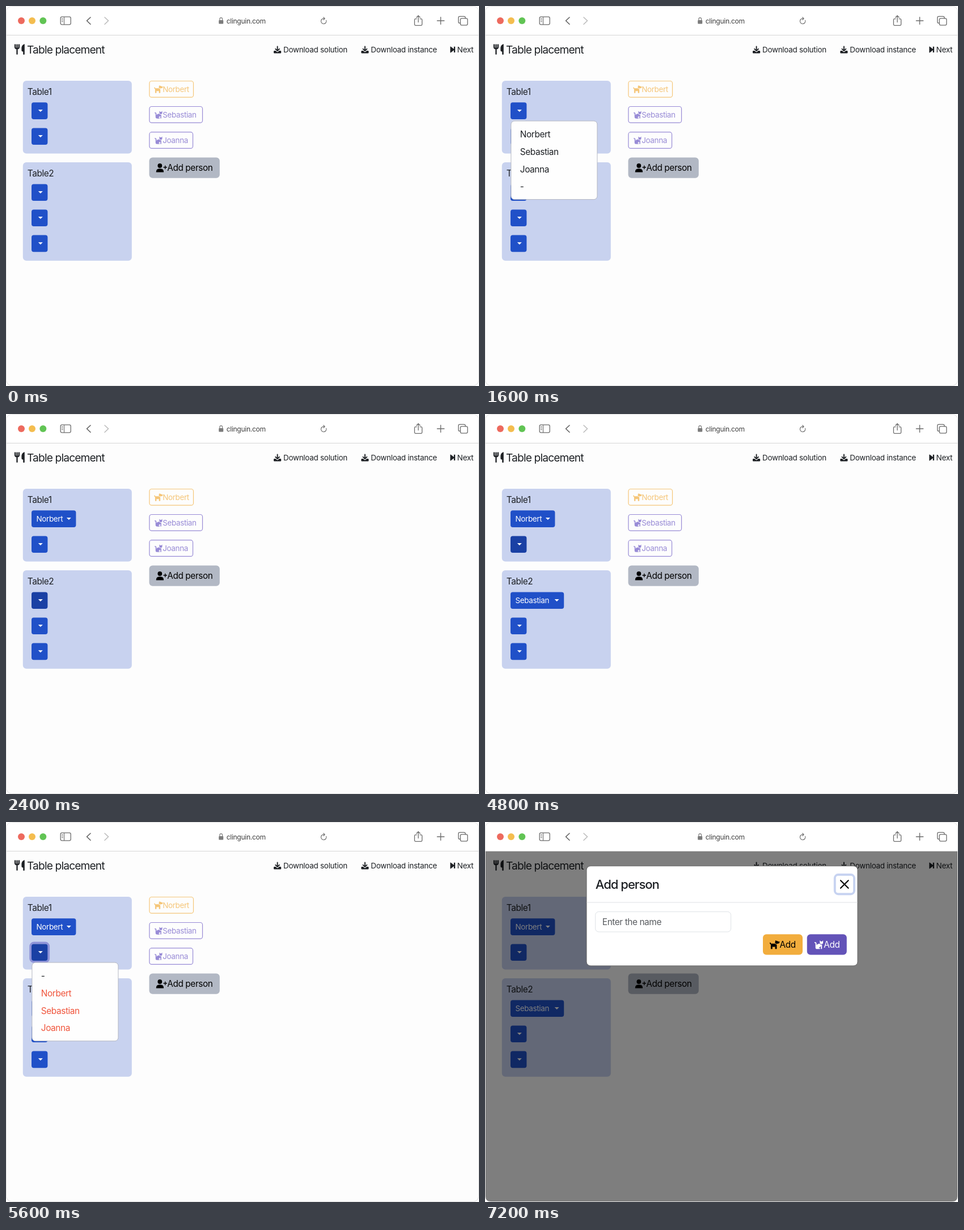
Animation, 834 px wide and 671 px high, one loop 8 s. Source, as an HTML page:

```html
<!DOCTYPE html>
<html lang="en">
<head>
<meta charset="utf-8">
<title>Table placement</title>
<style>
html, body { margin: 0; width: 100%; height: 100%; overflow: hidden; background: #fff; }
svg { display: block; width: 834px; height: 671px; }
text { font-family: Inter, "Open Sans", sans-serif; letter-spacing: -.026em; white-space: pre; }
</style>
</head>
<body>
<svg id="stage" viewBox="0 0 834 671"></svg>
<script>
const BLUE = '#2050c8', DARK = '#1a40a4', INK = '#1d2024', RED = '#f0553c';
const GOLD = '#f5c679', LILAC = '#988bd6';
const A = 'Norbert', B = 'Sebastian', C = 'Joanna';
const BODY = 15.36, SMALL = 13.44;

const rect = (x, y, w, h, r, fill, stroke = 'none', sw = 1) =>
  `<rect x="${x}" y="${y}" width="${w}" height="${h}" rx="${r}" fill="${fill}" stroke="${stroke}" stroke-width="${sw}"/>`;
const line = (d, color, w = 1.3) =>
  `<path d="${d}" fill="none" stroke="${color}" stroke-width="${w}" stroke-linecap="round" stroke-linejoin="round"/>`;
const fill = (d, color) => `<path d="${d}" fill="${color}"/>`;
const dot = (x, y, r, color) => `<circle cx="${x}" cy="${y}" r="${r}" fill="${color}"/>`;
const text = (s, x, y, size = BODY, color = INK, style = '') =>
  `<text x="${x}" y="${y}" font-size="${size}" fill="${color}" style="${style}">${s}</text>`;
const place = (x, y, scale, inner) => `<g transform="translate(${x} ${y}) scale(${scale})">${inner}</g>`;

const pets = {
  dog: 'M9.7 5 10.4.6Q11.2-.4 11.8.3L12.3 1h1.6L15.5 2H18V3.5Q18 6 15.5 6H13.3l-.2 1z' +
    'M13 8v7q0 1-1 1h-1q-1 0-1-1v-3.6q-2.5 1.2-5 0V15q0 1-1 1H3q-1 0-1-1V7.8Q.5 7.2 0 5.2 0 4 1 4t1 1q.3 1 1 1h6.5z',
  cat: 'M10 6h.5q1.4 2 3.5 2h1v7q0 1-1 1t-1-1v-4.4L8.8 14h1.7a1 1 0 0 1 0 2H6q-3 0-3-3V6Q3 5 2 5 1 5 1 4t1-1q3 .3 3 3v2.7Q7 6 10 6z' +
    'M11 4V0l2 2h2l2-2v4q0 3-3 3t-3-3z'
};
const pet = (kind, x, y, scale, color) => place(x, y, scale, fill(pets[kind], color));

function toolbar() {
  const g = '#6c6c6c';
  return rect(1, 1, 832, 50, 9, '#fff') +
    dot(27, 26, 6, '#ed6a5e') + dot(46, 26, 6, '#f4bd4f') + dot(65.3, 26, 6, '#61c454') +
    rect(96.2, 19.2, 18, 13.6, 2.5, 'none', g, 1.3) +
    line('M102.5 19.5v13M98.5 22.5h1.7M98.5 25h1.7M98.5 27.5h1.7', g, 1.1) +
    line('M149 20l-6.5 6 6.5 6.3', '#5c5c5c', 1.5) + line('M174 20l6.5 6-6.5 6.3', '#b9b9b9', 1.5) +
    rect(375.2, 25, 8, 6.4, 1.2, '#7c7c7c') + line('M376.9 25v-2a2.3 2.3 0 0 1 4.6 0v2', '#7c7c7c', 1.2) +
    text('clinguin.com', 388.7, 30.6, 12.1, '#404040') +
    line('M564.6 25.3a4.7 4.7 0 1 1-4.2-3.2h1.6M559.8 19.8l2.4 2.3-2.4 2.4', g, 1.1) +
    line('M724 22.7h-1.8q-1.8 0-1.8 1.8v8q0 1.8 1.8 1.8h9.6q1.8 0 1.8-1.8v-8q0-1.8-1.8-1.8H730M727 28.5V17.2M723.8 20.2l3.2-3.2 3.2 3.2', g) +
    line('M760.3 26h12.4M766.5 19.8v12.4', g, 1.4) +
    line('M801 30.2h-1q-2.3 0-2.3-2.3v-7.2q0-2.3 2.3-2.3h7.7q2.3 0 2.3 2.3v1.2', g) +
    rect(801.2, 21.9, 12.6, 12, 2.3, 'none', g, 1.3) +
    rect(1, 51, 832, 1, 0, '#d5d5d5');
}

function download(x, label) {
  return place(x, 70.5, 1,
    line('M6.6 1v7M3.2 5.3 6.6 8.7 10 5.3', INK, 1.9) +
    fill('M0 9.7q0-1.3 1.3-1.3h2.3l2 2q1 .8 2 0l2-2h2.3q1.3 0 1.3 1.3v2q0 1.3-1.3 1.3H1.3Q0 13 0 11.7z', INK)) +
    text(label, x + 17, 81.7, SMALL, INK, 'letter-spacing:-.02em');
}

function header() {
  return line('M16.1 68.5v4q0 2.8 3.4 2.8t3.4-2.8v-4M19.5 68.5v16.3', INK, 2.3) +
    fill('M32.4 67.3c-3 .8-5 3.6-5 7.7v3.2q0 2.2 2.2 2.2h.6v4.3a1.3 1.3 0 0 0 2.6 0V67.3z', INK) +
    text('Table placement', 37, 84, 19.2, INK, 'letter-spacing:-.045em') +
    download(472, 'Download solution') + download(626.3, 'Download instance') +
    fill('M783.3 72.2q0-1.3 1.1-.5l5.3 4.3v-4.3h2.3v10.4h-2.3v-4.2l-5.3 4.3q-1.1.7-1.1-.6z', INK) +
    text('Next', 795.6, 81.7, SMALL, INK, 'letter-spacing:-.02em');
}

function person(name, kind, y, w, color) {
  return rect(252.9, y + .5, w, 28.7, 4, 'none', color, 1.2) +
    pet(kind, 261.2, y + 8.2, .84, color) + text(name, 276.2, y + 19.6, SMALL, color);
}

function people() {
  return person(A, 'dog', 132, 77.6, GOLD) + person(B, 'cat', 177, 93.6, LILAC) + person(C, 'cat', 222.2, 76.6, LILAC) +
    rect(252.5, 267.5, 124.3, 36.3, 6, '#b2b8c4') +
    dot(271.3, 282, 3.9, '#000') + fill('M264.7 293.4q0-6.2 5.4-6.2h2.6q5.4 0 5.4 6.2z', '#000') +
    line('M278 284.8h5.4M280.7 282.1v5.4', '#000', 1.4) +
    text('Add person', 284.2, 291.4, BODY, '#000');
}

const seatY = [170.3, 215.4, 314.4, 359.5, 404.6];
const widths = { [A]: 78.4, [B]: 94.2 };

function seat(i, { picks = {}, hot, ring, bad = [] }) {
  const y = seatY[i], name = picks[i] || '', w = widths[name] || 28.4;
  const color = bad.includes(i) ? RED : '#fff';
  const cx = 45 + w - 12.6;
  return (hot === i && ring ? rect(43.2, y - 1.9, w + 3.6, 33.4, 6, 'none', '#8e93d8', 3.8) : '') +
    rect(45, y, w, 29.6, 4, hot === i ? DARK : BLUE) +
    text(name, 53.6, y + 19.6, SMALL, color) +
    fill(`M${cx - 4} ${y + 12.6}h8l-4 4z`, color);
}

function menu({ at, good, wrong = [] }) {
  const y = seatY[at] + 32.7;
  return rect(45.9, y, 152, 138.6, 6, '#fefefe', '#b5b8c2') +
    [...good, ...wrong].map((s, k) =>
      text(s, 61.8, y + 29 + k * 30.75, BODY, k < good.length ? INK : RED)).join('');
}

function alertBox() {
  return rect(.5, 602.4, 474.2, 54.8, 6, '#f9dcd6', '#f1b8ac') +
    text('Explanation', 16, 635.5, BODY, '#5f2014', 'font-weight:700') +
    text('All people on a table must prefer the same pet', 107.6, 635.5, BODY, '#5f2014') +
    line('M444 623l14 14M458 623l-14 14', '#705a55', 2);
}

function addButton(kind, x, bg, color) {
  return rect(x, 198.3, 70, 36.2, 6, bg) + pet(kind, x + 12, 209, .96, color) + text('Add', x + 29.5, 222.3, BODY, color);
}

function modal() {
  return fill('M1 52h832v609q0 9-9 9H10q-9 0-9-9z', 'rgba(0,0,0,.5)') +
    rect(179, 77.7, 478, 176.2, 7, '#fff', '#666') +
    rect(179.5, 141.5, 477, 1, 0, '#dee2e6') +
    text('Add person', 194.8, 117.8, 22, INK, 'font-weight:500;letter-spacing:-.045em') +
    rect(616.8, 93, 34.2, 34.2, 6, '#fff', '#c7d3f1', 3.9) +
    line('M627 103.2l13.6 13.6M640.6 103.2L627 116.8', '#000', 2.1) +
    rect(194.6, 158.4, 239, 35.6, 6, '#fff', '#dee2e6') +
    text('Enter the name', 206.8, 182, BODY, '#585b5f') +
    addButton('dog', 490, '#f2ad3d', '#000') + addButton('cat', 567.8, '#6353b8', '#fff');
}

const STEP = 800;
const first = { 0: A }, both = { 0: A, 2: B };
const second = { picks: first, hot: 2, ring: true, menu: { at: 2, good: [B, C, '-'], wrong: [A] } };
const steps = [
  {},
  { hot: 0 },
  { menu: { at: 0, good: [A, B, C, '-'] } },
  { picks: first, hot: 2 },
  second,
  second,
  { picks: both, hot: 1 },
  { picks: both, hot: 1, ring: true, menu: { at: 1, good: ['-'], wrong: [A, B, C] } },
  { picks: both, bad: [0, 1], alert: true },
  { picks: both, modal: true }
];

function draw(s) {
  return rect(.5, .5, 833, 670, 10, '#fdfdfd', '#dedede') + toolbar() + header() +
    rect(29.8, 132, 192, 128.6, 6, '#c8d2ef') + text('Table1', 37.8, 157) +
    rect(29.8, 276, 192, 173.7, 6, '#c8d2ef') + text('Table2', 37.8, 301) +
    seatY.map((_, i) => seat(i, s)).join('') + people() +
    (s.menu ? menu(s.menu) : '') + (s.alert ? alertBox() : '') + (s.modal ? modal() : '');
}

const stage = document.getElementById('stage');
const start = performance.now();
let shown = -1;
function tick() {
  const now = Math.floor((performance.now() - start) / STEP) % steps.length;
  if (now !== shown) stage.innerHTML = draw(steps[shown = now]);
  requestAnimationFrame(tick);
}
tick();
</script>
</body>
</html>
```
